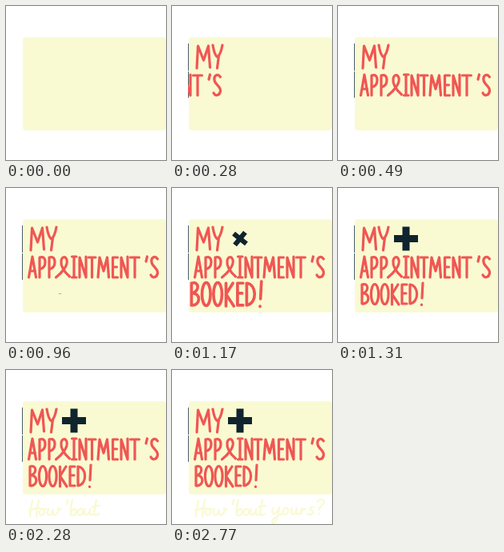
Write an HTML page that moves like this. It is 200x193 px and loops after 3.68 s.

```html
<!DOCTYPE html>
<html lang="en">
<head>
<meta charset="utf-8">
<title>My appointment's booked</title>
<style>
  html, body { margin: 0; width: 100%; height: 100%; overflow: hidden; background: #fff; }
  svg { display: block; width: 100%; height: 100%; }
  .lettering, #script { fill: none; stroke-linecap: round; stroke-linejoin: round; }
  .lettering { stroke: #f05653; stroke-width: 3.2; }
  #script { stroke: #f9fad2; stroke-width: 2.3; }
</style>
</head>
<body>
<svg viewBox="0 0 200 193" role="img" aria-label="My appointment's booked! How 'bout yours?">
  <clipPath id="window"><rect x="20" y="40" width="180" height="115"/></clipPath>
  <rect x="21" y="39" width="179" height="117" rx="4" fill="#f9fad2"/>
  <path id="edge" d="M20 47h1v34h-1zM20 82h1v33h-1z" fill="#4b5f68"/>
  <g class="lettering" clip-path="url(#window)">
    <g id="my">
      <path d="M31 78L32.500 50L39.500 68L45.500 50L47.500 77"/>
      <path d="M51 49Q53 62 57 64Q61 60 63 49M58.500 62L56.500 78"/>
    </g>
    <g id="appointment">
      <path d="M28.500 112L33 86L37.500 112M30 104H36.500"/>
      <path d="M42 112V87Q49 85 49 93Q49 100 42 102"/>
      <path d="M54 112V87Q61 85 61 93Q61 100 54 102"/>
      <path d="M62.500 112C69 107 78 97 76 90C74 85 70 86 69 91C68 98 74 106 79.500 111"/>
      <path d="M82.500 86H88M85 86V112M82.500 112H88"/>
      <path d="M92 112V87L100 112V86"/>
      <path d="M103 87H112M107.500 87V112"/>
      <path d="M115 112L117 87L122 104L126.500 87L128.500 112"/>
      <path d="M139.500 87H133.500V112H139.500M133.500 99H138.500"/>
      <path d="M144 112V87L152 112V86"/>
      <path d="M155.500 87H166.500M161 87V112"/>
      <path d="M176.500 86L175 92"/>
      <path d="M189.500 89C186 84 181 87 182 93C183 99 190.500 101 189.500 107C188 113 183 113 181 109"/>
    </g>
  </g>
  <g id="booked" class="lettering">
    <path d="M30 121V145M30 121C39 118 39 131 30 132C41 131 40 146 30 145"/>
    <ellipse cx="46" cy="133" rx="4.600" ry="12.500"/>
    <ellipse cx="58.500" cy="133" rx="4.600" ry="12.500"/>
    <path d="M67.500 121V146M75 121L67.500 133L76 146"/>
    <path d="M86 121H80V145H86M80 132H85"/>
    <path d="M90 121V145C102 143 101 122 90 121"/>
    <path d="M106 119L105 138M104.500 146V146.500"/>
  </g>
  <path id="plus" d="M-4.500-15h9v10.500h10.500v9h-10.500v10.500h-9v-10.500h-10.500v-9h10.500z" fill="#10242e"/>
  <g id="script"></g>
</svg>
<script>
const LOOP = 3680, STEP = 70;

// Pen strokes: path, first step, last step
const strokes = [
  ["M33 164Q30 174 30 184", 0, 1],
  ["M41 163Q38 173 38 184", 1, 2],
  ["M29 176Q35 173 42 173", 2, 3],
  ["M45 174C40 176 41 183 45 182C50 180 49 173 45 174Q47 176 50 174", 3, 4],
  ["M53 174C51 179 52 183 55 182Q58 180 59 175C58 181 60 183 63 181Q67 177 65 173Q66 176 69 174", 4, 6.5],
  ["M77 163L76 168", 6.5, 7],
  ["M83 163C81 171 80 178 81 182C87 184 90 176 86 174Q83 174 81 179", 7, 8],
  ["M93 174C88 176 89 183 93 182C98 180 97 173 93 174", 8, 9],
  ["M99 174C97 180 99 183 102 181Q105 178 105 174C104 180 105 183 108 181", 9, 10],
  ["M113 163C111 171 109 179 111 182Q113 183 116 180", 10, 10.6],
  ["M108 172Q112 170 117 170", 10.6, 11],
  ["M126 173C124 179 127 182 130 179Q133 176 134 172C133 183 130 192 126 192C122 190 130 183 138 180", 11, 13],
  ["M142 173C137 175 138 182 142 181C147 179 146 172 142 173", 13, 14],
  ["M150 173C148 179 150 182 153 180Q156 177 156 173C155 179 156 182 159 180", 14, 15],
  ["M162 173L161 181Q162 174 167 174", 15, 15.5],
  ["M177 172C172 171 171 175 175 176C179 179 174 183 169 180", 15.5, 16],
  ["M182 165C184 161 191 161 190 166C189 170 184 170 184 175", 16, 17.5],
  ["M183.500 180V180.500", 17.5, 18]
];

const el = id => document.getElementById(id);
const move = (id, value) => el(id).setAttribute("transform", value);
const show = (node, on) => node.setAttribute("visibility", on ? "visible" : "hidden");
const stepsSince = (t, start, count) =>
  Math.max(0, Math.min(count, Math.floor((t - start) / STEP) + 1));

const pens = strokes.map(([d, from, to]) => {
  const path = document.createElementNS("http://www.w3.org/2000/svg", "path");
  path.setAttribute("d", d);
  path.setAttribute("pathLength", 1);
  el("script").append(path);
  return { path, from, to };
});

function draw(t) {
  const slide = stepsSince(t, 140, 6);
  show(el("edge"), slide);
  move("my", `translate(${Math.min(0, 16 * slide - 48)})`);
  move("appointment", `translate(${43 * (slide - 6)})`);
  show(el("my"), slide);

  const pop = stepsSince(t, 960, 6);
  const size = [0, .04, .4, .8, 1.15, 1.07, 1][pop];
  show(el("booked"), pop);
  move("booked", `translate(67.5 132.5) scale(${size}) translate(-67.5 -132.5)`);

  const spin = Math.max(0, Math.min(1, (pop - 1) / 4.4));
  show(el("plus"), spin);
  move("plus", `translate(85 63.5) rotate(${160 * (spin - 1)}) scale(${spin})`);

  const written = stepsSince(t, 1580, 18);
  for (const { path, from, to } of pens) {
    const part = Math.max(0, Math.min(1, (written - from) / (to - from)));
    show(path, part);
    path.setAttribute("stroke-dasharray", part < 1 ? `${part} 2` : "none");
  }
}

const start = performance.now();
function tick() {
  draw((performance.now() - start) % LOOP);
  requestAnimationFrame(tick);
}
tick();
</script>
</body>
</html>
```
